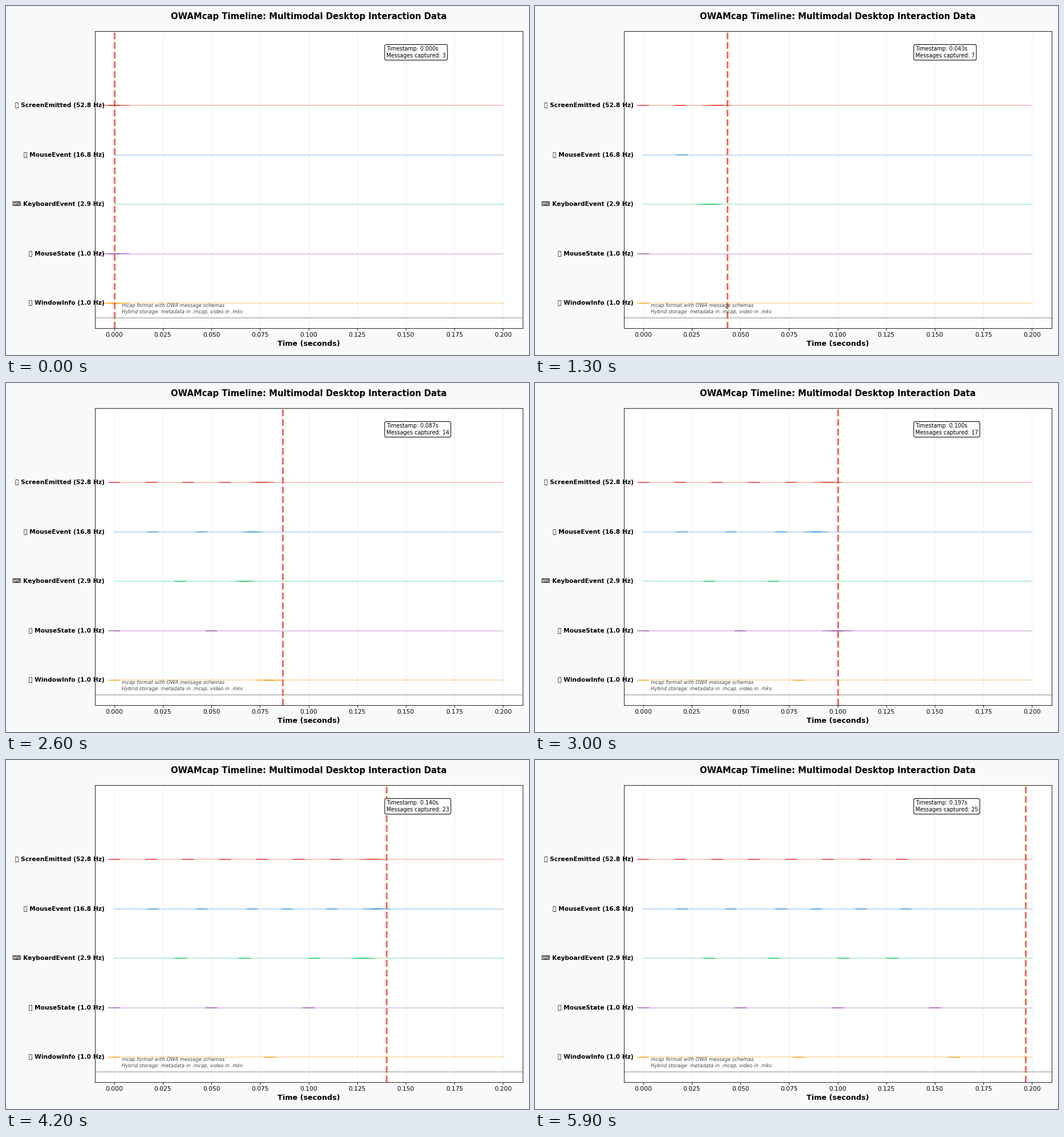
A matplotlib script that plays this animation: 917x611 px, repeating every 6 s.

```python
import matplotlib.pyplot as plt
from matplotlib.animation import FuncAnimation
from matplotlib.patches import Circle

W, H = 917, 611
DPI = W / 12
FRAMES = 60
SPAN = 0.2      # seconds of recording shown
FRESH = 0.02    # how long a new message keeps its halo

TOPICS = [
    ("\U0001F5A5 ScreenEmitted (52.8 Hz)", "#e74c3c", [0.019 * k for k in range(8)]),
    ("\U0001F5B1 MouseEvent (16.8 Hz)", "#3498db",
     [0.020, 0.045, 0.071, 0.089, 0.112, 0.135]),
    ("\u2328 KeyboardEvent (2.9 Hz)", "#2ecc71", [0.034, 0.067, 0.103, 0.128]),
    ("\U0001F5B1 MouseState (1.0 Hz)", "#9b59b6", [0.05 * k for k in range(4)]),
    ("\U0001FA9F WindowInfo (1.0 Hz)", "#f39c12", [0.08 * k for k in range(3)]),
]

plt.rcParams["font.family"] = "DejaVu Sans"

fig = plt.figure(figsize=((W + 1e-6) / DPI, (H + 1e-6) / DPI), dpi=DPI,
                 facecolor="#f8f9fa")
left, right, top, bottom = 155.6, 905.5, 44.0, 563.7
ax = fig.add_axes([left / W, 1 - bottom / H, (right - left) / W, (bottom - top) / H])
ax.set_xlim(-0.01, 0.21)
ax.set_ylim(-0.5, 5.5)
ax.set_yticks([])
ax.set_xticks([0.025 * k for k in range(9)])
ax.xaxis.set_major_formatter("{x:.3f}")
ax.grid(True, axis="x", alpha=0.22)
ax.set_xlabel("Time (seconds)", fontsize=12, fontweight="bold")
ax.set_title("OWAMcap Timeline: Multimodal Desktop Interaction Data",
             fontsize=14, fontweight="bold", pad=20)


def add_circle(t, y, radius, color, alpha):
    return ax.add_patch(Circle((t, y), radius, color=color, alpha=alpha, visible=False))


events = []  # (time, halo, dot)
for row, (label, color, times) in enumerate(TOPICS):
    y = len(TOPICS) - 1 - row
    ax.plot([0, SPAN], [y, y], color=color, alpha=0.3, lw=2)
    ax.text(-0.005, y, label, ha="right", va="center", fontsize=10, fontweight="bold")
    for t in times:
        halo = add_circle(t, y, 0.008, color, 0.4)
        dot = add_circle(t, y, 0.003, color, 0.8)
        events.append((t, halo, dot))

ax.axhline(-0.3, color="#2c3e50", alpha=0.3, lw=2)
ax.text(0.004, -0.2,
        "mcap format with OWA message schemas\n"
        "Hybrid storage: metadata in .mcap, video in .mkv",
        fontsize=8, style="italic", alpha=0.7)

cursor = ax.axvline(0, color="#e74c3c", alpha=0.8, lw=3, ls="--")
info = ax.text(0.14, 4.97, "", fontsize=9,
               bbox=dict(boxstyle="round,pad=0.3", facecolor="white"))


def update(i):
    now = SPAN * i / FRAMES
    count = 0
    for t, halo, dot in events:
        age = now - t
        seen = age >= -1e-9
        count += seen
        dot.set_visible(seen)
        halo.set_visible(seen and age < FRESH - 1e-9)
        halo.set_radius(0.005 + 0.003 * (1 - age / FRESH))
    cursor.set_xdata([now, now])
    info.set_text(f"Timestamp: {now:.3f}s\nMessages captured: {count}")
    return cursor, info


anim = FuncAnimation(fig, update, frames=FRAMES, interval=100, repeat=True,
                     repeat_delay=0, blit=False)
plt.show()
```
